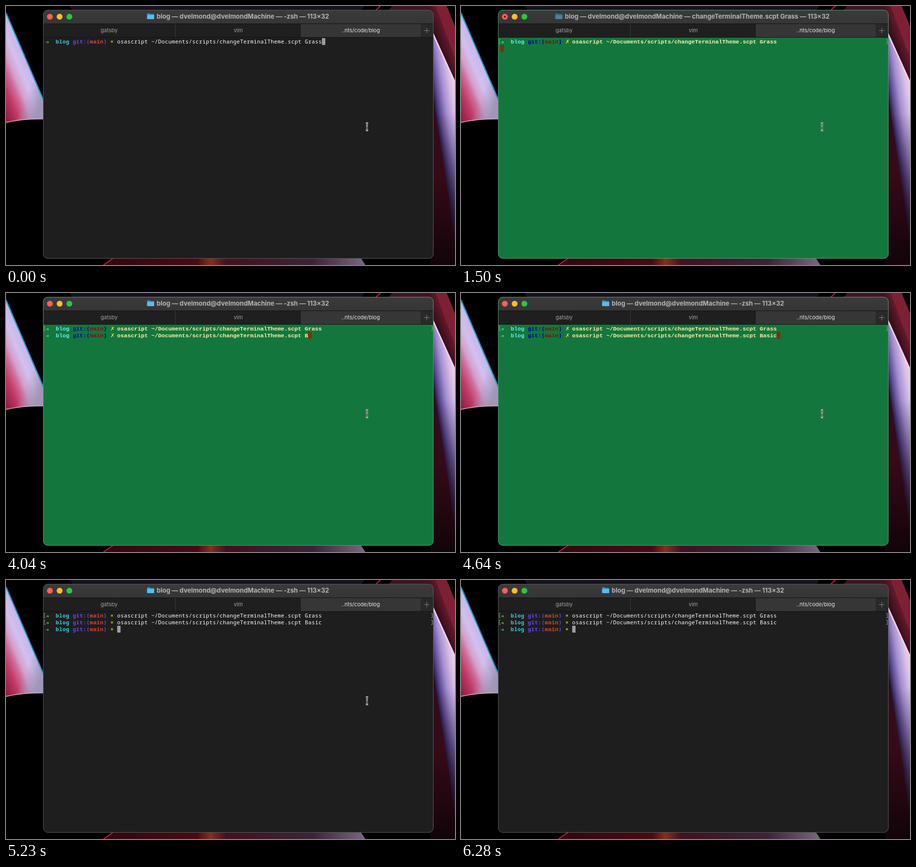
These frames come from a looping animation (921x532 px, 6420 ms). An HTML page:

```html
<!DOCTYPE html>
<html lang="en">
<head>
<meta charset="utf-8">
<title>Terminal themes</title>
<style>
html, body { margin: 0; width: 100%; height: 100%; overflow: hidden; background: #000; }
svg { display: block; }
.ui { font: 11px Inter, Arial, sans-serif; text-anchor: middle; fill: #a3a3a3; }
#title { font: 700 13px Inter, Arial, sans-serif; fill: #b5b5b5; }
#win {
  --bg: #1e1e1e; --text: #fff; --arrow: #4cc23c; --dir: #38c8d3; --git: #6a42f6;
  --branch: #d9432c; --dirty: #c6c42c; --caret: #9c9c9c; --mark: #9a9a9a; --edge: #5c5c5c;
}
#win.grass {
  --bg: #13773d; --text: #fff0a5; --arrow: #4be36a; --dir: #62f0ee; --git: #0000a8;
  --branch: #8f0800; --dirty: #e7e04b; --caret: #8e2800; --mark: #6fae74; --edge: #5b9a72;
}
#rows text { font: 500 11px "Noto Sans Mono", "DejaVu Sans Mono", monospace; letter-spacing: .4px; }
#rows .b { font-weight: 700; }
.grass #rows text { font: 700 11.667px "Liberation Mono", "Courier New", monospace; letter-spacing: 0; }
#rows .sym, .grass #rows .sym { font: 9px "DejaVu Sans", sans-serif; }
.grass #rows .cross { font-size: 11px; }
</style>
</head>
<body>
<svg width="921" height="532" viewBox="0 0 921 532">
  <defs>
    <linearGradient id="cone" gradientUnits="userSpaceOnUse" x1="0" y1="15" x2="-81" y2="49">
      <stop offset="0" stop-color="#c4b8ea"/><stop offset=".2" stop-color="#d3c0ee"/>
      <stop offset=".38" stop-color="#d3a0cc"/><stop offset=".5" stop-color="#cf6c98"/>
      <stop offset=".68" stop-color="#bf3b66"/><stop offset="1" stop-color="#8e1440"/>
    </linearGradient>
    <linearGradient id="coneEnd" gradientUnits="userSpaceOnUse" x1="46" y1="172" x2="78" y2="186">
      <stop offset="0" stop-color="#a096b8" stop-opacity="0"/><stop offset="1" stop-color="#a096b8"/>
    </linearGradient>
    <linearGradient id="sheet" gradientUnits="userSpaceOnUse" x1="877" y1="190" x2="921" y2="183.4">
      <stop offset="0" stop-color="#2a1a40"/><stop offset=".2" stop-color="#5e4c96"/>
      <stop offset=".5" stop-color="#a58fd0"/><stop offset=".85" stop-color="#d8bfe6"/>
      <stop offset="1" stop-color="#e9cbe6"/>
    </linearGradient>
    <linearGradient id="fade" x1="0" y1="0" x2="0" y2="1">
      <stop offset=".4" stop-color="#1c0a1c" stop-opacity="0"/><stop offset="1" stop-color="#1c0a1c" stop-opacity=".85"/>
    </linearGradient>
    <linearGradient id="maroon" x1="0" y1="0" x2="0" y2="1">
      <stop offset="0" stop-color="#2b0d22"/><stop offset=".5" stop-color="#360b18"/><stop offset="1" stop-color="#12040a"/>
    </linearGradient>
    <linearGradient id="red" gradientUnits="userSpaceOnUse" x1="874" y1="70" x2="914" y2="55">
      <stop offset="0" stop-color="#1c0810"/><stop offset=".5" stop-color="#4f1423"/><stop offset="1" stop-color="#7c2034"/>
    </linearGradient>
    <linearGradient id="floor">
      <stop offset="0" stop-color="#33060f"/><stop offset=".36" stop-color="#4a0a14"/>
      <stop offset=".41" stop-color="#86301c"/><stop offset=".47" stop-color="#43101f"/>
      <stop offset=".8" stop-color="#3d2338"/><stop offset="1" stop-color="#7a6780"/>
    </linearGradient>
    <linearGradient id="bar" x1="0" y1="0" x2="0" y2="1">
      <stop offset="0" stop-color="#3b3b3b"/><stop offset="1" stop-color="#353535"/>
    </linearGradient>
    <clipPath id="frame"><rect x="76" y="8" width="801" height="511" rx="10"/></clipPath>
    <path id="beam" d="M738 240.5Q740.5 240.5 740.5 243V253Q740.5 255.5 738 255.5M743 240.5Q740.5 240.5 740.5 243M740.5 253Q740.5 255.5 743 255.5M739 250.5H742"/>
  </defs>

  <rect width="921" height="532"/>
  <path d="M0 14L78 196V232Q36 231 0 240Z" fill="url(#cone)"/>
  <path d="M0 14L78 196V232Q36 231 0 240Z" fill="url(#coneEnd)"/>
  <path d="M0 14L78 196" fill="none" stroke="#1c93bd" stroke-width="2.5"/>
  <path d="M0 239Q36 231 78 232" fill="none" stroke="#d9aac6" stroke-width="1.5"/>
  <path d="M130 0H735L728 10H138Z" fill="#19121f"/>
  <path d="M768 0L757 10" stroke="#d3193c" stroke-width="2"/>
  <path d="M792 0H880V10H784Z" fill="#3d1624"/>
  <path d="M866 0H881L921 104V170L866 30Z" fill="url(#red)"/>
  <path d="M881 0H904L921 42V106Z" fill="#7e2034"/>
  <path d="M870 150L921 400V532H870Z" fill="url(#maroon)"/>
  <path d="M870 46L921 158V480L870 145Z" fill="url(#sheet)"/>
  <path d="M870 46L921 158V480L870 145Z" fill="url(#fade)"/>
  <path d="M870 44L921 157" stroke="#efd3e8" stroke-width="3"/>
  <path d="M220 518H728L737 532H199Z" fill="url(#floor)"/>
  <path d="M220 518L200 532" stroke="#c91e43" stroke-width="2"/>

  <g id="win">
    <g clip-path="url(#frame)">
      <rect x="76" y="8" width="801" height="511" style="fill:var(--bg)"/>
      <rect x="76" y="8" width="801" height="29" fill="url(#bar)"/>
      <rect x="76" y="36" width="801" height="29" fill="#111"/>
      <path d="M76 37H347V64H76ZM348 37H605V64H348Z" fill="#1f1f1f"/>
      <path d="M606 37H849V64H606Z" fill="#363636"/>
      <path d="M850 37H877V64H850Z" fill="#292929"/>
      <path d="M347.5 37V64M605.5 37V64M849.5 37V64" stroke="#3d3d3d"/>
    </g>
    <path d="M857.5 50.5H868.5M863 45V56" stroke="#858585"/>
    <rect x="76.5" y="8.5" width="800" height="510" rx="9.5" fill="none" style="stroke:var(--edge)"/>
    <circle cx="90" cy="22" r="6" fill="#ff5f57"/>
    <circle cx="110" cy="22" r="6" fill="#febc2e"/>
    <circle cx="130" cy="22" r="6" fill="#28c840"/>
    <circle id="busy" cx="90" cy="22" r="2" fill="#6b0d08"/>
    <g id="folder">
      <path d="M0 2Q0 .5 1.5 .5H5L6.5 2H13Q14.5 2 14.5 3.5V11Q14.5 12.5 13 12.5H1.5Q0 12.5 0 11Z" fill="#2c96cf"/>
      <path d="M0 4H14.5V11Q14.5 12.5 13 12.5H1.5Q0 12.5 0 11Z" fill="#55bff0"/>
    </g>
    <text id="title" y="26"></text>
    <g class="ui">
      <text x="211.5" y="54">gatsby</text>
      <text x="476.5" y="54">vim</text>
      <text id="tab" x="727.5" y="54" fill="#e6e6e6"></text>
    </g>
    <g id="rows"></g>
  </g>
  <g id="mouse" fill="none">
    <use href="#beam" stroke="#fff" stroke-width="2.8"/>
    <use href="#beam" stroke="#000"/>
  </g>
</svg>
<script>
const LOOP = 6420, CELL = 7, LEFT = 81, TOP = 66, LINE = 14;
const $ = id => document.getElementById(id);
const SCRIPT = 'changeTerminalTheme.scpt';
const CMD = `osascript ~/Documents/scripts/${SCRIPT} `;
const HOST = 'blog — dvelmond@dvelmondMachine — ';
const SIZE = ' — 113×32';

// [start, title x, title, running, busy window]
const titles = [
  [0, 289, HOST + '-zsh' + SIZE],
  [1350, 174, `blog — ${CMD}Grass — -zsh${SIZE}`, true],
  [1500, 193, `${HOST}${SCRIPT} Grass${SIZE}`, false, true],
  [1650, 289, HOST + '-zsh' + SIZE],
  [5090, 143, `blog — ${CMD}Basic — ${SCRIPT} Basic…`, true, true],
  [5230, 289, HOST + '-zsh' + SIZE]
];
// Second command line: recalled from history, erased, retyped
const edits = [
  [1650, null], [2400, 'Grass'], [2840, 'Gras'], [2990, 'Gra'], [3140, 'Gr'],
  [3290, ''], [4040, 'B'], [4340, 'Bas'], [4490, 'Basi'], [4640, 'Basic']
];
const at = (steps, t) => steps.filter(s => s[0] <= t).pop();

const put = (col, row, color, text, cls = '') =>
  `<text x="${LEFT + col * CELL}" y="${TOP + row * LINE + 11}" class="${cls}" style="fill:var(--${color})">${text}</text>`;

function prompt(row, cmd, done, grass) {
  const y = TOP + row * LINE + 2.5;
  const marks = `<path d="M81 ${y}H78.5V${y + 9}H81M872 ${y}H874.5V${y + 9}H872" fill="none" style="stroke:var(--mark)"/>`;
  return put(0, row, 'arrow', '➜', 'sym') + put(3, row, 'dir', 'blog', 'b') +
    put(8, row, 'git', 'git:(', 'b') + put(13, row, 'branch', 'main', 'b') +
    put(17, row, 'git', ')', 'b') +
    put(19, row, 'dirty', grass ? '✗' : '×', grass ? 'sym cross' : 'b') +
    put(21, row, 'text', cmd) + (done ? marks : '');
}

const caret = (col, row) =>
  `<rect x="${LEFT + col * CELL}" y="${TOP + row * LINE}" width="${CELL}" height="${LINE}" style="fill:var(--caret)"/>`;

function rows(t, grass) {
  let out = prompt(0, CMD + 'Grass', t >= 1350, grass);
  if (t < 1350) return caret(81, 0) + out;
  if (t < 1650) return caret(0, 1) + out;
  const word = at(edits, t)[1];
  const cmd = word === null ? '' : CMD + word;
  out += prompt(1, cmd, t >= 5090, grass);
  if (t < 5090) return caret(21 + cmd.length, 1) + out;
  if (t < 5230) return caret(0, 2) + out;
  return caret(21, 2) + out + prompt(2, '', false, grass);
}

let shown = '';
function draw() {
  const t = performance.now() % LOOP;
  const grass = t >= 1500 && t < 5230;
  const [, x, title, running, busy] = at(titles, t);
  const html = rows(t, grass);
  if (html !== shown) $('rows').innerHTML = shown = html;
  $('win').setAttribute('class', grass ? 'grass' : '');
  $('title').textContent = title;
  $('title').setAttribute('x', x + 20);
  $('folder').setAttribute('transform', `translate(${x + .5} 14.5)`);
  $('folder').setAttribute('opacity', busy ? .55 : 1);
  $('busy').setAttribute('visibility', busy ? 'visible' : 'hidden');
  $('tab').textContent = running ? 'osascript' : '..nts/code/blog';
  $('mouse').setAttribute('transform', `translate(0 ${t >= 5830 ? 17 : 0})`);
  $('mouse').setAttribute('visibility', t < 5980 ? 'visible' : 'hidden');
  requestAnimationFrame(draw);
}
draw();
</script>
</body>
</html>
```
